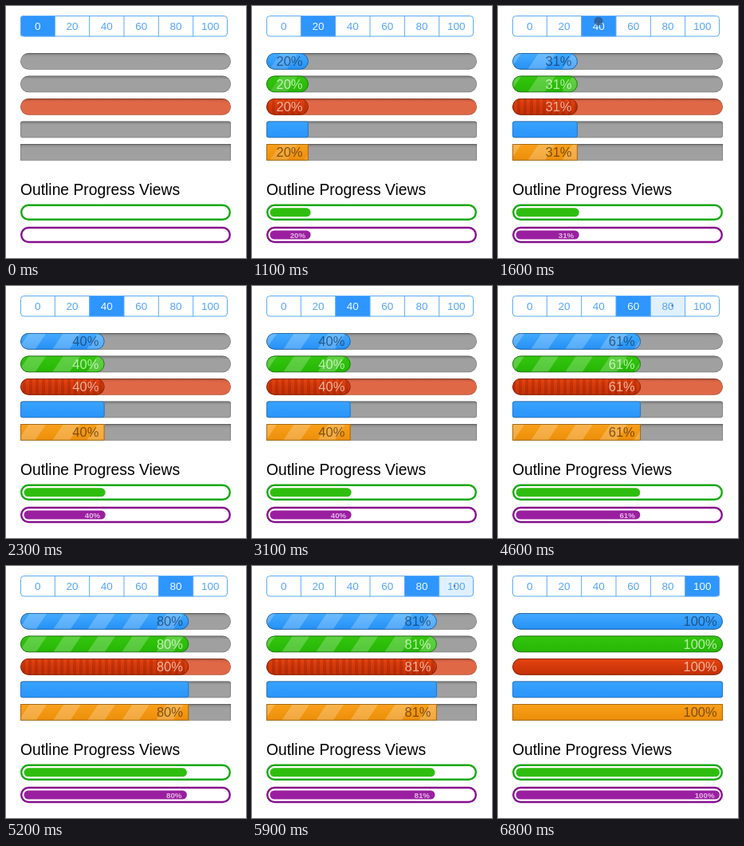
Animation, 301 px wide and 316 px high, one loop 8 s. Source, as an HTML page with a canvas:

```html
<!DOCTYPE html>
<html lang="en">
<head>
<meta charset="utf-8">
<title>Progress views</title>
<style>
html, body { margin: 0; width: 100%; height: 100%; overflow: hidden; background: #fff; }
canvas { display: block; width: 301px; height: 316px; }
</style>
</head>
<body>
<canvas id="stage"></canvas>
<script>
const W = 301, H = 316, LOOP = 8000, STEP = 100;
const FILL_TIME = 400, SELECT_DELAY = 90, TOUCH_TIME = 600;
const FONT = '"Liberation Sans", Arial, sans-serif';
const LEFT = 18, WIDTH = 264;

const canvas = document.getElementById('stage');
const ctx = canvas.getContext('2d');
const dpr = window.devicePixelRatio || 1;
canvas.width = W * dpr;
canvas.height = H * dpr;

// Each tap moves the progress on by one segment.
const taps = [
  { at: 130, x: 83, y: 24 },
  { at: 1380, x: 126, y: 19 },
  { at: 3220, x: 170, y: 18 },
  { at: 4580, x: 218.5, y: 24.5 },
  { at: 5880, x: 254, y: 25 }
];

const bars = [
  { y: 59, r: 10.5, track: '#a0a0a0', fill: ['#43aaff', '#2590f5'], edge: '#1d5d9c', text: 'rgba(20,45,75,.66)', stripe: 'wide' },
  { y: 87.5, r: 10.5, track: '#a0a0a0', fill: ['#33c60e', '#26b605'], edge: '#18770a', text: 'rgba(240,255,235,.72)', stripe: 'wide' },
  { y: 116, r: 10.5, track: '#df6847', fill: ['#e5430f', '#c22f07'], edge: '#7c2410', text: 'rgba(255,230,220,.72)', stripe: 'fine' },
  { y: 144.5, r: 3, track: '#a0a0a0', fill: ['#39a3ff', '#2894fa'], edge: '#2872b8' },
  { y: 173, r: 0, track: '#a0a0a0', fill: ['#f9a01b', '#ec8e08'], edge: '#96600f', text: 'rgba(75,45,5,.7)', stripe: 'wide' }
];

const clamp = v => Math.max(0, Math.min(1, v));

function roundRect(x, y, w, h, r) {
  r = Math.max(0, Math.min(r, w / 2, h / 2));
  ctx.beginPath();
  ctx.moveTo(x + r, y);
  ctx.arcTo(x + w, y, x + w, y + h, r);
  ctx.arcTo(x + w, y + h, x, y + h, r);
  ctx.arcTo(x, y + h, x, y, r);
  ctx.arcTo(x, y, x + w, y, r);
  ctx.closePath();
}

function label(str, x, y, font, color, align) {
  ctx.font = font + ' ' + FONT;
  ctx.fillStyle = color;
  ctx.textAlign = align;
  ctx.fillText(str, x, y);
}

function vertical(y, h, colors) {
  const g = ctx.createLinearGradient(0, y, 0, y + h);
  colors.forEach((c, i) => g.addColorStop(i / (colors.length - 1), c));
  return g;
}

function drawSegments(t) {
  const seg = 260 / 6, top = 12, h = 26.5;
  const selected = taps.filter(p => t >= p.at + SELECT_DELAY).length;
  const pressed = taps.findIndex(p => t >= p.at && t < p.at + SELECT_DELAY) + 1;
  ctx.save();
  roundRect(LEFT, top, 260, h, 4);
  ctx.clip();
  ctx.fillStyle = '#2f95ff';
  ctx.fillRect(LEFT + selected * seg, top, seg, h);
  if (pressed) {
    ctx.fillStyle = '#e0f0ff';
    ctx.fillRect(LEFT + pressed * seg, top, seg, h);
  }
  ctx.restore();
  ctx.strokeStyle = '#5aaafa';
  ctx.lineWidth = 1;
  roundRect(LEFT + .5, top + .5, 259, h - 1, 4);
  ctx.stroke();
  for (let i = 0; i < 6; i++) {
    const x = LEFT + i * seg;
    if (i) {
      ctx.beginPath();
      ctx.moveTo(x, top);
      ctx.lineTo(x, top + h);
      ctx.stroke();
    }
    label(String(i * 20), x + seg / 2, 30, '13.5px', i === selected ? '#f2f9ff' : '#55a5f5', 'center');
  }
}

function drawStripes(bar, w, h, t, alpha) {
  const wide = bar.stripe === 'wide';
  const period = wide ? 43 : 8, width = period / 2, slant = wide ? 14 : 0;
  const shift = (t * .03 + 14) % period;
  ctx.fillStyle = wide ? `rgba(255,255,255,${.22 * alpha})` : `rgba(90,15,0,${.19 * alpha})`;
  for (let x = LEFT - period * 2 + shift; x < LEFT + w; x += period) {
    ctx.beginPath();
    ctx.moveTo(x, bar.y + h);
    ctx.lineTo(x + slant, bar.y);
    ctx.lineTo(x + slant + width, bar.y);
    ctx.lineTo(x + width, bar.y + h);
    ctx.fill();
  }
}

function drawBar(bar, p, t) {
  const h = 20.8, w = WIDTH * p;
  ctx.save();
  roundRect(LEFT, bar.y, WIDTH, h, bar.r);
  ctx.fillStyle = bar.track;
  ctx.fill();
  ctx.clip();
  ctx.fillStyle = vertical(bar.y, 5, ['rgba(0,0,0,.32)', 'rgba(0,0,0,.08)', 'rgba(0,0,0,0)']);
  ctx.fillRect(LEFT, bar.y, WIDTH, 5);
  ctx.strokeStyle = 'rgba(0,0,0,.22)';
  ctx.lineWidth = 1.5;
  roundRect(LEFT, bar.y, WIDTH, h, bar.r);
  ctx.stroke();

  if (w > 0) {
    ctx.save();
    roundRect(LEFT, bar.y, w, h, bar.r);
    ctx.fillStyle = vertical(bar.y, h, bar.fill);
    ctx.fill();
    ctx.clip();
    if (bar.stripe) {
      const fade = clamp((t - 100) / 1400) * (1 - clamp((t - 6280) / 450));
      drawStripes(bar, w, h, t, fade);
    }
    ctx.restore();
    ctx.strokeStyle = bar.edge;
    ctx.lineWidth = .9;
    roundRect(LEFT + .45, bar.y + .45, w - .9, h - .9, bar.r);
    ctx.stroke();
    if (bar.text && w > 44) {
      label(Math.round(p * 100) + '%', LEFT + w - 7.3, bar.y + 16.3, '16.5px', bar.text, 'right');
    }
  }
  ctx.restore();
}

function drawOutline(y, line, fill, p, withText) {
  ctx.strokeStyle = line;
  ctx.lineWidth = 2.4;
  roundRect(LEFT + 1.2, y + 1.2, WIDTH - 2.4, 18, 9);
  ctx.stroke();
  if (!p) return;
  const w = 255.5 * p;
  ctx.fillStyle = fill;
  roundRect(22.5, y + 4.7, w, 11, 5.5);
  ctx.fill();
  if (withText && w > 28) {
    label(Math.round(p * 100) + '%', 22.5 + w - 6.5, y + 13.7, 'bold 9.7px', 'rgba(255,235,255,.75)', 'right');
  }
}

function drawTouch(t) {
  for (const tap of taps) {
    const age = t - tap.at;
    if (age < 0 || age > TOUCH_TIME) continue;
    const grow = clamp((age + 30) / 300);
    const fade = 1 - clamp((age - 400) / 200);
    ctx.fillStyle = `rgba(50,85,130,${.75 * fade})`;
    ctx.beginPath();
    ctx.arc(tap.x, tap.y, 1 + 6.5 * grow * grow, 0, Math.PI * 2);
    ctx.fill();
  }
}

function draw(t) {
  ctx.setTransform(dpr, 0, 0, dpr, 0, 0);
  ctx.fillStyle = '#fff';
  ctx.fillRect(0, 0, W, H);
  const p = taps.reduce((sum, tap) => sum + .2 * clamp((t - tap.at) / FILL_TIME), 0);
  drawSegments(t);
  bars.forEach(bar => drawBar(bar, p, t));
  label('Outline Progress Views', LEFT, 237, '19.3px', '#000', 'left');
  drawOutline(248.6, '#16a80e', '#2fbe10', p, false);
  drawOutline(276.8, '#860f8c', '#9a1fa0', p, true);
  drawTouch(t);
}

const start = performance.now();
function tick() {
  const t = (performance.now() - start) % LOOP;
  draw(Math.floor(t / STEP) * STEP);
  requestAnimationFrame(tick);
}
tick();
</script>
</body>
</html>
```
